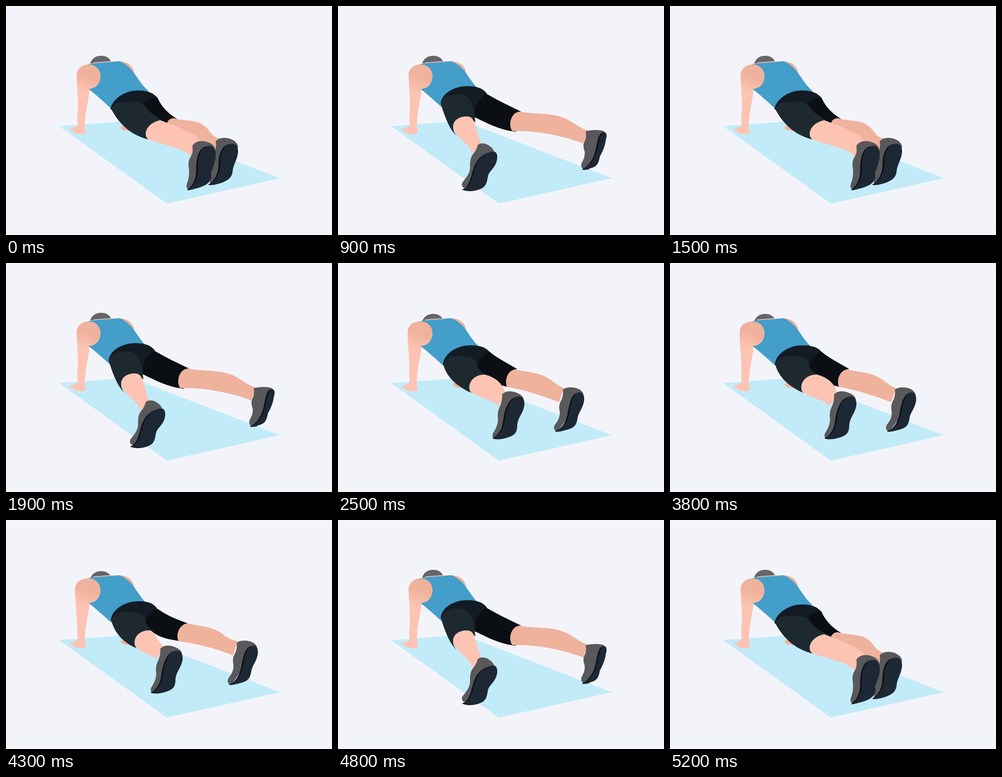
Animation, 600 px wide and 423 px high, one loop 5300 ms. Source, as an HTML page:

```html
<!DOCTYPE html>
<html lang="en">
<head>
<meta charset="utf-8">
<title>Plank jacks</title>
<style>
  html, body { margin: 0; width: 100%; height: 100%; overflow: hidden; background: #f3f4f9; }
  svg { display: block; width: 100%; height: 100%; }
  .skin { fill: #fdc4b3; }
  .shade { fill: #efb29c; }
  .upper { fill: #59585a; }
  .rim { fill: #0a1017; }
  .sole { fill: #1e2834; }
</style>
</head>
<body>
<svg viewBox="0 0 600 423">
  <defs>
    <linearGradient id="glow" gradientUnits="userSpaceOnUse" x1="158" y1="116" x2="142" y2="158">
      <stop offset=".35" stop-color="#efb29c"/>
      <stop offset="1" stop-color="#fdc4b3"/>
    </linearGradient>
    <path id="soleL"/>
    <path id="soleR"/>
  </defs>
  <rect width="600" height="1" fill="#fcfcfe"/>
  <path fill="#c2ebf9" d="M98 222L230 212L504 318L296 365Z"/>
  <path class="shade" d="M211 225C213 220 220 218 228 222V231C220 231 212 228 211 225Z"/>
  <path class="shade" d="M206 102C222 102 234 109 236 124L226 124Z"/>
  <path id="head" fill="#656468"/>
  <path fill="#439ec9" d="M150 108C165 104 180 104 208 102C216 104 224 110 232 119C242 132 248 144 262 157L230 180L193 189C181 178 166 164 150 152Z"/>
  <path d="M160 105.500C172 103 184 103.500 196 102.500" fill="none" stroke="#f2c0b2" stroke-width="1.500"/>
  <path id="arm" fill="url(#glow)"/>
  <path id="waist" fill="#131c25"/>
  <path id="shortR" fill="#0b0f13"/>
  <path id="calfR" class="shade"/>
  <path id="upperR" class="upper"/>
  <use href="#soleR" class="rim" x="-3" y="1"/>
  <use href="#soleR" class="sole"/>
  <path id="shortL" fill="#1d292e"/>
  <path id="calfL" class="skin"/>
  <path id="upperL" class="upper"/>
  <use href="#soleL" class="rim" x="-3" y="1"/>
  <use href="#soleL" class="sole"/>
</svg>
<script>
const $ = id => document.getElementById(id);

// Move a path of x y pairs
function shift(d, dx, dy) {
  let i = 0;
  return d.replace(/[\d.]+/g, n => +n + (i++ % 2 ? dy : dx));
}

// The second airborne pose of a shoe is the first one moved outwards
const shoe = (closed, air, open, dx, dy) => [closed, air, shift(air, dx, dy), open];

// Four poses per part: feet together, two airborne, feet apart
const stops = [0, 0.4, 0.55, 1];
const shapes = {
  head: [0, 2, 2.5, 0].map(dy =>
    shift('M155 106C158 97 165 92 175 92C184 92 190 95 194 104Z', 0, dy)),
  arm: [0, 2, 3, 0].map(s =>
    `M152 108C${138 - s} 108 ${129 - s} 117 ${130 - s} 132C${131 - s} 160 ${134 - s} 180 131 205L132 220` +
    'C131 224 117 226 117 229C117 231 122 231 124 232C126 236 132 237 138 237C144 237 147 236 147 232L145 223' +
    'C146 200 148 190 150 180C152 168 154 160 153 153C165 153 174 143 174 130C174 117 165 108 152 108Z'),
  waist: [
    'M192 190C196 172 218 156 243 156C262 156 272 161 280 171L258 190L205 200Z',
    'M193 188C194 170 215 152 245 152C263 152 273 157 280 165L258 195L205 200Z',
    'M193 185C194 168 215 150 245 150C263 150 273 155 279 165L258 192L205 200Z',
    'M189 180C190 164 211 148 238 148C257 148 268 153 274 162L253 206L200 200Z'
  ],
  shortR: [
    'M254 181C258 172 270 168 279 170C288 190 302 200 315 209C305 207 299 211 296 217C278 210 265 203 254 185Z',
    'M255 190C258 178 268 168 279 164C295 177 312 185 330 196C315 196 305 215 313 229C290 224 272 218 255 195Z',
    'M256 188C259 177 268 168 279 164C295 176 315 184 335 191C319 192 311 215 323 224C295 220 272 216 256 192Z',
    'M253 190C255 176 264 168 273 162C290 172 310 182 337 195C320 196 312 215 328 232C303 231 275 217 251 205Z'
  ],
  calfR: [
    'M296 217C299 208 307 205 314 209C345 214 356 210 372 228C378 236 383 242 392 245L386 266C355 255 330 238 296 217Z',
    'M311 229C306 218 312 196 328 197C360 204 368 201 390 215C400 222 407 228 416 231L407 257C375 245 345 235 311 229Z',
    'M318 224C312 215 317 193 334 191C360 197 375 196 395 208C405 216 412 221 426 224L418 250C385 237 350 228 318 224Z',
    'M321 231C313 222 317 197 334 195C365 201 395 196 421 209C435 216 446 226 459 230L452 254C410 238 365 230 321 231Z'
  ],
  shortL: [
    'M193 189C199 178 214 176 230 177C246 178 254 180 259 188C266 200 280 206 296 215L284 211C253 218 253 244 264 247C230 239 208 218 193 189Z',
    'M194 188C198 174 212 171 230 172C246 173 255 178 256 188C257 195 262 200 272 206L270 206C241 207 237 234 246 240C222 230 200 212 194 188Z',
    'M194 186C198 172 212 169 230 170C246 171 256 177 257 186C257 194 262 198 270 205L264 204C236 204 232 230 241 237C218 228 200 210 194 186Z',
    'M189 180C194 167 208 163 222 163C238 164 244 174 248 184C251 192 251 202 253 215L238 204C210 204 206 228 219 240C208 232 198 210 189 180Z'
  ],
  calfL: [
    'M264 247C253 244 253 218 284 211C310 222 345 230 365 256L341 278C325 262 300 260 264 247Z',
    'M246 240C237 234 241 207 270 206C294 212 305 226 310 246L293 263C280 252 265 250 246 240Z',
    'M241 237C232 230 236 204 264 204C275 206 272 216 292 236L276 257C265 248 255 247 241 237Z',
    'M219 237C206 227 210 204 238 204C254 205 250 222 265 258L246 273C245 258 228 250 219 237Z'
  ],
  upperL: shoe(
    'M343 258C349 249 360 248 370 251C380 254 386 260 385 268L340 338C333 340 331 335 333 328C337 318 338 308 336 296C335 276 346 280 343 258Z',
    'M302 243C308 236 318 236 327 239C336 242 343 247 342 256L294 324C286 326 283 322 285 315C291 306 296 295 294 284C293 266 303 264 302 243Z',
    'M257 257C263 252 271 253 278 258C284 262 288 266 288 274L238 336C230 338 226 332 229 326C236 317 244 308 243 296C243 270 252 277 257 257Z',
    -18, -5),
  soleL: shoe(
    'M369 259C380 256 387 264 386 276C386 290 378 300 378 314C378 326 366 333 352 336C345 338 339 340 336 339C346 332 353 320 353 302C353 284 356 264 369 259Z',
    'M329 247C339 244 344 252 343 263C341 277 331 286 330 298C330 311 327 317 316 321C308 324 297 326 287 323C298 318 305 306 307 290C309 272 316 251 329 247Z',
    'M284 269C292 267 295 276 292 287C289 299 278 305 276 314C274 326 273 334 262 338C252 342 240 342 231 338C246 334 248 312 253 297C259 281 270 271 284 269Z',
    -18, -5),
  upperR: shoe(
    'M386 250C391 243 402 242 412 245C420 248 427 253 427 261L383 329C376 331 374 326 376 320C379 310 381 300 379 288C377 277 389 270 386 250Z',
    'M414 234C419 229 430 229 438 231C446 233 452 238 452 246L405 310C398 311 396 306 399 299C405 292 409 284 408 274C404 254 416 256 414 234Z',
    'M456 231C466 229 476 228 485 230C490 231 493 233 492 240L462 302C452 304 446 299 448 291C452 284 455 277 454 269C447 248 459 254 456 231Z',
    10.5, -7),
  soleR: shoe(
    'M411 255C421 252 428 258 427 270C426 284 418 293 417 306C416 317 408 323 395 327C388 329 380 331 375 329C386 323 393 311 394 294C394 276 399 258 411 255Z',
    'M443 239C450 237 454 244 453 254C451 268 443 275 441 286C439 298 436 304 424 307C416 309 408 312 402 310C414 306 421 296 425 280C428 262 432 242 443 239Z',
    'M488 233C494 232 496 238 493 247C491 262 486 270 482 278C480 288 478 297 466 299C461 301 456 303 452 301C462 296 468 288 473 278C480 262 479 240 488 233Z',
    10.5, -7)
};

// Blend every number in two paths of the same form
function blend(a, b, k) {
  const nums = b.match(/[\d.]+/g);
  let i = 0;
  return a.replace(/[\d.]+/g, n => +(+n + (nums[i++] - n) * k).toFixed(2));
}

function pose(p) {
  const i = p < stops[1] ? 0 : p < stops[2] ? 1 : 2;
  const k = (p - stops[i]) / (stops[i + 1] - stops[i]);
  for (const id in shapes) {
    $(id).setAttribute('d', blend(shapes[id][i], shapes[id][i + 1], k));
  }
}

// Spread of the feet at each 100 ms step of one jump
const spread = [0, 0, 0, 0.28, 0.55, 0.86, 1, 1, 1, 1, 0.8, 0.6, 0.4];
const LOOP = 5300, STEP = 100;
let start, shown = -1;

function tick(now) {
  start ??= now;
  const step = Math.floor((now - start) % LOOP / STEP);
  if (step !== shown) pose(spread[(shown = step) % spread.length]);
  requestAnimationFrame(tick);
}
pose(0);
requestAnimationFrame(tick);
</script>
</body>
</html>
```
